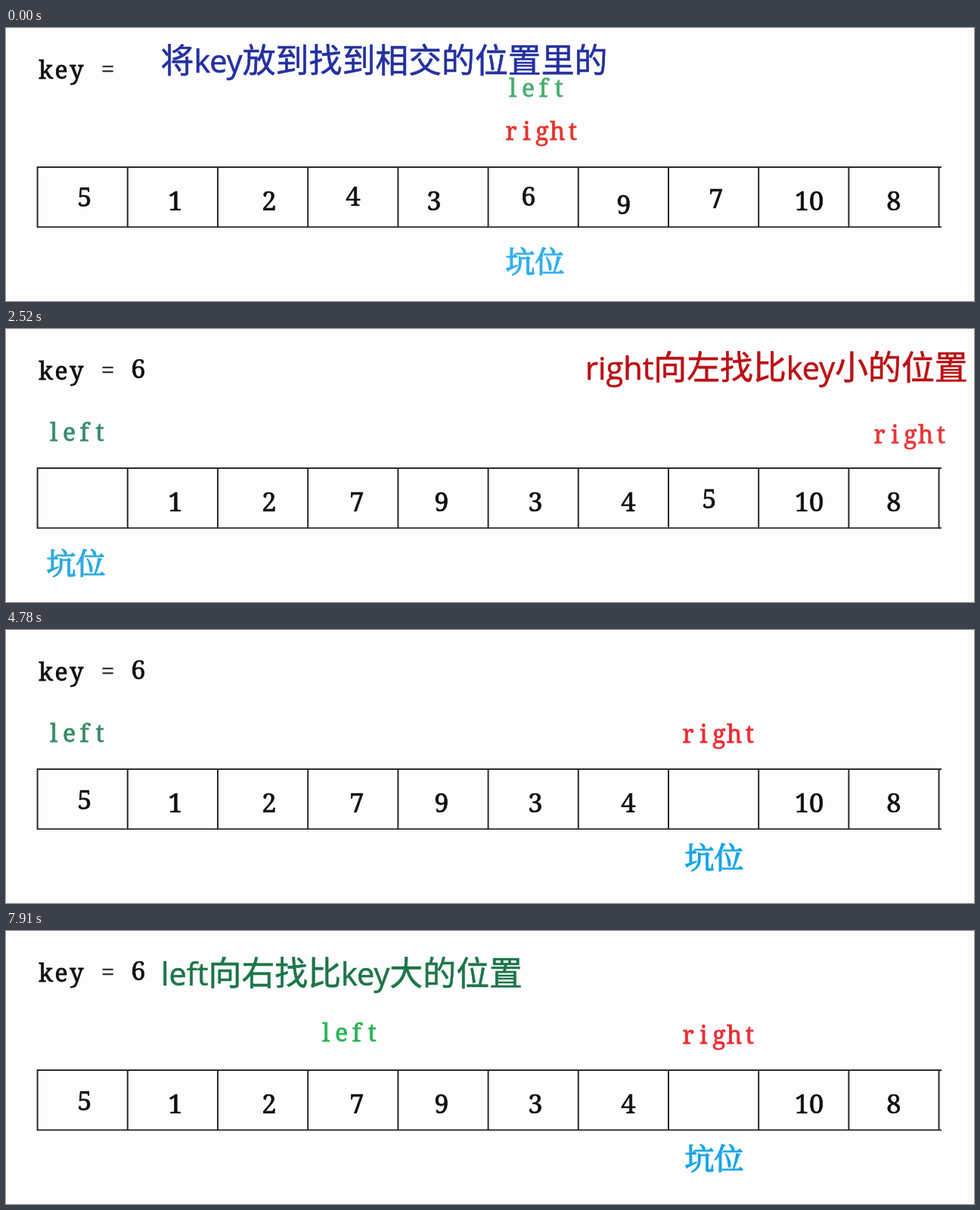
An HTML page with a canvas that plays this animation: 1280x361 px, repeating every 8 s.

```html
<!DOCTYPE html>
<html lang="zh-CN">
<head>
<meta charset="utf-8">
<style>
  html, body { margin: 0; width: 100%; height: 100%; overflow: hidden; background: #fdfdfd; }
  canvas { display: block; }
</style>
</head>
<body>
<canvas id="stage" width="1280" height="361"></canvas>
<script>
const ctx = document.getElementById('stage').getContext('2d');
const LOOP = 8000, PITCH = 20.3;
const SERIF = '"Noto Serif", "Liberation Serif", serif';
const HAN = '"Noto Sans CJK SC", "Noto Sans CJK", sans-serif';
const BLUE = '#2430a0';

// Each digit is [text, centre x, baseline].
const fixed = [['1', 224, 241], ['2', 348, 241], ['10', 1062, 241], ['8', 1174, 241]];
const middle = [['7', 464, 241], ['9', 576, 241], ['3', 700, 241], ['4', 823, 241]];
const sorted = [['5', 104, 236], ['4', 459, 234.5], ['3', 566, 241], ['6', 691, 234.5],
  ['9', 817, 245.5], ['7', 939, 237.5]];
const firstSix = ['6', 102, 241], keySix = ['6', 175, 64.5];
const farFive = ['5', 930, 236.5], firstFive = ['5', 104, 236.5];

// Every step overrides part of the scene; labels are [x, baseline, colour].
const steps = [
  [0, { digits: sorted, left: [660, 91, '#49ae70'], right: [658, 148, '#e5352f'],
    pit: [660.5, 323, '#2fb0ea'], titles: [['将key放到找到相交的位置里的', 204.5, 58.5, BLUE]] }],
  [800, { digits: [firstSix, ...middle, farFive], left: [53, 148, '#44ae6c'],
    right: [1145, 151, '#e8363a'], pit: [53.5, 324, '#2caade'], titles: [] }],
  [1460, { digits: [keySix, ...middle, farFive], titles: [['保存key', 270.5, 66.5, '#111']] }],
  [1860, { titles: [['保存key', 270.5, 66.5, '#111'], ['形成坑位', 254.5, 134, BLUE]] }],
  [2520, { left: [53, 148, '#368c66'],
    titles: [['right向左找比key小的位置', 766, 66.5, '#bb1015']] }],
  [2650, { right: [1012, 149, '#ee2b33'] }],
  [3260, { right: [892, 149, '#ee2b33'] }],
  [3790, { titles: [['将找到的位置里的数放到坑位里', 204.5, 59, BLUE]] }],
  [3920, { digits: [keySix, firstFive, ...middle] }],
  [4780, { pit: [897.5, 315, '#18a5e8'], titles: [] }],
  [5850, { titles: [['left向右找比key大的位置', 205, 71.5, '#1c7549']] }],
  [5920, { left: [164, 146, '#2bb457'] }],
  [6980, { left: [287, 146, '#2bb457'] }],
  [7910, { left: [413, 146, '#2bb457'] }]
];

function ink(text, x, y, colour, weight) {
  ctx.fillStyle = ctx.strokeStyle = colour;
  ctx.lineWidth = weight;
  ctx.fillText(text, x, y);
  ctx.strokeText(text, x, y);
}

// One character per equally wide slot.
function mono(text, x, y, colour, weight = 0.8) {
  ctx.font = '32px ' + SERIF;
  ctx.textAlign = 'center';
  [...text].forEach((c, i) => ink(c, x + (i + 0.5) * PITCH, y, colour, weight));
}

// Latin and Chinese runs use their own fonts.
function title(text, x, y, colour) {
  ctx.textAlign = 'left';
  for (const run of text.match(/[a-z]+|[^a-z]+/g)) {
    ctx.font = /[a-z]/.test(run) ? '41.5px "Open Sans", sans-serif' : '43.9px ' + HAN;
    ink(run, x, y, colour, 0.6);
    x += ctx.measureText(run).width;
  }
}

function grid() {
  ctx.fillStyle = '#2b2b2b';
  ctx.fillRect(41, 183, 1196, 2);
  ctx.fillRect(41, 262.3, 1196, 1.8);
  for (let i = 0; i <= 10; i++) ctx.fillRect(40.6 + i * 119.2, 183, 2, 81);
}

function draw(now) {
  const t = now % LOOP;
  const scene = Object.assign({}, ...steps.filter(s => s[0] <= t).map(s => s[1]));
  ctx.fillStyle = '#fdfdfd';
  ctx.fillRect(0, 0, 1280, 361);
  grid();
  mono('key', 42.5, 67, '#111');
  mono('=', 124.5, 66, '#333', 0.3);
  mono('left', ...scene.left);
  mono('right', ...scene.right);

  ctx.font = '34.5px ' + SERIF;
  for (const [text, x, y] of [...fixed, ...scene.digits]) ink(text, x, y, '#111', 0.7);

  const [x, y, colour] = scene.pit;
  ctx.textAlign = 'left';
  ctx.font = '39px "Noto Serif CJK SC", ' + HAN;
  ink('坑位', x, y, colour, 1.4);
  scene.titles.forEach(line => title(...line));
}

const start = performance.now();
function tick() {
  draw(performance.now() - start);
  requestAnimationFrame(tick);
}
tick();
</script>
</body>
</html>
```
